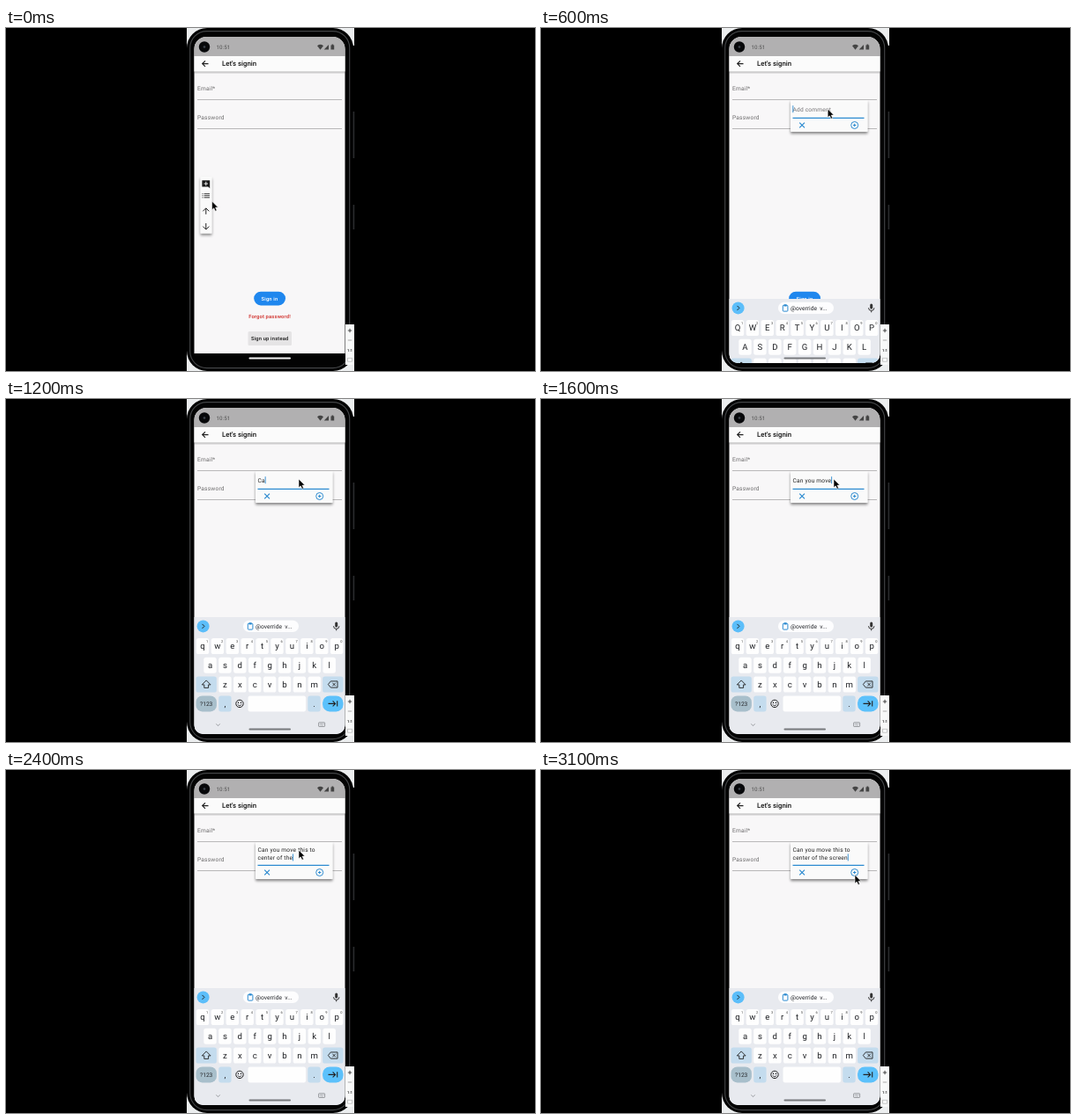
An HTML page for the animation above (3200 ms loop, 600 by 390 pixels).

```html
<!DOCTYPE html>
<html lang="en">
<head>
<meta charset="utf-8">
<title>Sign-in comment</title>
<style>
  html, body { margin: 0; width: 100%; height: 100%; overflow: hidden; background: #000; }
  svg { display: block; width: 600px; height: 390px; }
  text { font-family: Roboto, sans-serif; white-space: pre; text-rendering: geometricPrecision; }
  .field { font-size: 6.6px; letter-spacing: .2px; }
  .label { font-size: 5.8px; font-weight: 500; letter-spacing: .16px; text-anchor: middle; }
  .key { font-size: 9.6px; text-anchor: middle; fill: #202226; }
  .line { fill: none; stroke: #222; }
  .blue { fill: none; stroke: #2b8ad0; }
</style>
</head>
<body>
<svg viewBox="0 0 600 390">
  <defs>
    <clipPath id="screen"><path d="M213.500 24a14 14 0 0 1 14-14H370.500a14 14 0 0 1 14 14V371a10 10 0 0 1-10 10H223.500a10 10 0 0 1-10-10Z"/></clipPath>
    <filter id="shadow" x="-40%" y="-30%" width="180%" height="180%">
      <feDropShadow dx="0" dy="2.2" stdDeviation="1.8" flood-color="#000" flood-opacity=".45"/>
    </filter>
    <linearGradient id="fade" x2="0" y2="1"><stop stop-color="#000" stop-opacity=".3"/><stop offset="1" stop-color="#000" stop-opacity="0"/></linearGradient>
  </defs>

  <!-- phone body -->
  <rect width="600" height="390"/>
  <rect x="205" width="190" height="390" fill="#eceeef"/>
  <rect x="205" y="0" width="189" height="390" rx="23"/>
  <rect x="208.700" y="3.600" width="181" height="383" rx="19" fill="#030303" stroke="#444648" stroke-width="1.100"/>
  <path d="M394 20V370" stroke="#000" stroke-width="2"/>
  <path d="M394.400 95V148M394.400 201V229" stroke="#2b2c2e" stroke-width="1.600"/>

  <g clip-path="url(#screen)">
    <!-- app -->
    <rect x="213" y="10" width="172" height="360.200" fill="#f8f7f8"/>
    <rect x="213" y="49" width="172" height="3.500" fill="url(#fade)"/>
    <rect x="213" y="32" width="172" height="17.500" fill="#fbfbfb"/>
    <rect x="213" y="10" width="172" height="22" fill="#b1b0b1"/>
    <circle cx="225" cy="21.500" r="6.200" fill="#07080a"/>
    <circle cx="225" cy="21.500" r="1.300" fill="#3c434c"/>
    <text x="238.500" y="24" font-size="6.200" letter-spacing=".1" fill="#505050">10:51</text>
    <g fill="#444">
      <path d="M353 20.200q3.500-2.800 7 0L356.500 24.700Z"/>
      <path d="M360.700 24.500H366V19Z"/>
      <path d="M368.500 19.400h1v-.8h1.700v.8h1v5.200h-3.700Z"/>
    </g>
    <path class="line" d="M229.500 40.600H222.800M226 37.300L222.700 40.600L226 43.900" stroke-width="1.200"/>
    <text x="245" y="43.200" font-size="7.800" font-weight="500" fill="#111">Let's signin</text>
    <g class="field" fill="#6c6b6c">
      <text x="217" y="71.300">Email*</text>
      <text x="217" y="103.800">Password</text>
    </g>
    <path d="M217 81.500H381M217 114.500H381" stroke="#b3b2b3" stroke-width=".9"/>
    <rect x="281.200" y="299.800" width="35.800" height="15.600" rx="7.800" fill="#1f87ee"/>
    <text class="label" x="299" y="309.800" fill="#fff">Sign in</text>
    <text class="label" x="299" y="330.400" fill="#cf2a25">Forgot password!</text>
    <rect x="274.500" y="345" width="49.500" height="16" rx="1.500" fill="#e5e4e5"/>
    <text class="label" x="299.200" y="355.100" fill="#1c1c1c">Sign up instead</text>

    <!-- floating tools -->
    <g id="tools">
      <rect x="220.500" y="169" width="13" height="64.500" rx="1" fill="#fafafa" filter="url(#shadow)"/>
      <path d="M222.400 173.300h8.800v9l-1.800-1.700h-7Z" fill="#181818"/>
      <path d="M226.800 174.700v4.600M224.500 177h4.600" stroke="#fff" stroke-width=".9"/>
      <path class="line" d="M224.600 188.600h6.400M224.600 190.700h6.400M224.600 192.800h6.400M222.500 188.600h1M222.500 190.700h1M222.500 192.800h1" stroke-width=".9"/>
      <path class="line" d="M226.800 211.800V205M223.300 208.300L226.800 204.800L230.300 208.300"/>
      <path class="line" d="M226.800 222V229M223.300 225.600L226.800 229.100L230.300 225.600"/>
    </g>

    <!-- comment box -->
    <g id="dialog">
      <rect id="card" x="283" y="82" width="87.500" height="36" rx="1" fill="#fafafa" filter="url(#shadow)"/>
      <text id="first" class="field" x="285.500"></text>
      <text id="second" class="field" x="285.500" y="101.800" fill="#222"></text>
      <rect id="caret" width=".9" height="8" fill="#2b8ad0"/>
      <g id="actions">
        <path class="blue" d="M285.500 102.400H366.500" stroke-width="1.200"/>
        <path class="blue" d="M293.200 107.600l5.800 5.800M299 107.600l-5.800 5.800" stroke-width="1.200"/>
        <circle class="blue" cx="355.700" cy="110.500" r="4"/>
        <path class="blue" d="M355.700 108.800v3.400M354 110.500h3.400"/>
      </g>
    </g>

    <!-- keyboard and navigation -->
    <rect id="nav" x="213" y="370.200" width="172" height="11"/>
    <g id="keyboard"></g>
    <rect id="home" x="275.500" y="374.600" width="47.500" height="1.900" rx=".95"/>
  </g>

  <!-- emulator side controls -->
  <rect x="385" y="337" width="10" height="46" fill="#f8f9f9"/>
  <path class="line" d="M387.800 344h4.400M390 341.800v4.400" stroke-width=".8"/>
  <path d="M387.800 355h4.400" stroke="#888" stroke-width=".7"/>
  <text x="390" y="367.500" font-size="4.200" font-weight="700" text-anchor="middle" fill="#333">1:1</text>
  <rect x="387.700" y="375.200" width="4.600" height="4" fill="none" stroke="#aaa" stroke-width=".6"/>

  <path id="pointer" d="M0 0V9.800L2.200 7.800L3.800 11.200L5.500 10.400L4 7.100H7Z" fill="#000" stroke="#fff" stroke-width=".6"/>
</svg>

<script>
const LOOP = 3200, STEP = 100;
const MESSAGE = "Can you move this to center of the screen";
const WRAP = 21, LINE_MAX = 24;

// [time, x, y] of the pointer tip
const POINTER = [
  [0, 233.6, 197], [100, 227.5, 178], [300, 283, 83], [400, 300, 89], [500, 316.6, 92],
  [700, 333.8, 92], [1200, 332, 91], [2700, 332, 91], [3100, 356, 119.3]
];
// [time, typed characters]
const TYPING = [[900, 0], [1200, 2], [2100, 24], [2400, 34], [2700, 41]];
// [time, keyboard offset]
const SLIDE = [[500, 133], [600, 60], [700, 0]];

const $ = id => document.getElementById(id);
const show = (node, on) => node.setAttribute("display", on ? "inline" : "none");

function track(keys, t, col = 1) {
  if (t <= keys[0][0]) return keys[0][col];
  for (let i = 1; i < keys.length; i++) {
    const a = keys[i - 1], b = keys[i];
    if (t <= b[0]) return a[col] + (b[col] - a[col]) * (t - a[0]) / (b[0] - a[0]);
  }
  return keys[keys.length - 1][col];
}

const TINT = "#c4dcee";
const cap = (x, y, w, fill = "#fefefe", r = 2.6) =>
  `<rect x="${x - w / 2}" y="${y - 9}" width="${w}" height="18" rx="${r}" fill="${fill}"/>`;
const icon = (d, width = 1) => `<path class="line" d="${d}" stroke-width="${width}"/>`;

function buildKeyboard() {
  const pitch = 16.9;
  let out = `<rect x="213" y="248" width="172" height="134" fill="#e8eaef"/>`;

  // suggestion strip
  out += `<circle cx="223.600" cy="258.400" r="7" fill="#5cbefa"/>` + icon("M222.500 255.900l2.500 2.500l-2.500 2.500");
  out += `<rect x="269" y="251.800" width="63" height="13.200" rx="6.600" fill="#fdfdfe"/>`;
  out += `<rect class="blue" x="274.300" y="255.300" width="5.600" height="6.800" rx=".8"/>
    <path d="M275.600 254.200h3v2.300h-3Z" fill="#2b8ad0"/>`;
  out += `<text x="283" y="260.900" font-size="6.700" fill="#25272b">@override  v...</text>`;
  out += `<rect x="373.200" y="253.500" width="3" height="6" rx="1.500" fill="#333"/>` +
    icon("M371.500 258.200a3.200 3.200 0 0 0 6.400 0M374.700 261.400v2", .9);

  // letter rows
  [["qwertyuiop", 223, 281], ["asdfghjkl", 231.5, 302.7], ["zxcvbnm", 248.4, 324.5]].forEach(([letters, x0, y], row) => {
    [...letters].forEach((ch, i) => {
      const x = x0 + i * pitch;
      out += cap(x, y, 14.4) + `<text class="key letter" x="${x}" y="${y + 3.4}">${ch}</text>`;
      if (!row) out += `<text x="${x + 5.2}" y="${y - 4.4}" font-size="4" text-anchor="middle" fill="#444">${(i + 1) % 10}</text>`;
    });
  });

  // function keys
  out += cap(227.2, 324.5, 23.4, TINT) + cap(370.8, 324.5, 23.4, TINT);
  out += `<path id="shift" d="M227.200 319.900L222.300 324.900H224.800V328.400H229.600V324.900H232.100Z" stroke="#222" stroke-width=".9" stroke-linejoin="round"/>`;
  out += icon("M365.400 324.500L368.300 320.900H376V328.100H368.300ZM370.300 322.700l3.600 3.600M373.900 322.700l-3.600 3.600", .9);

  // bottom row
  const y = 346.4;
  out += cap(227.2, y, 23.4, "#a8bfcb", 7) +
    `<text x="227.200" y="348.900" font-size="6.600" text-anchor="middle" fill="#25272b">?123</text>`;
  out += cap(248.4, y, 14.4, TINT) + cap(349.5, y, 14.4, TINT) + cap(307.3, y, 65.6);
  out += `<text class="key" x="248.400" y="350">,</text><text class="key" x="349.500" y="350">.</text>`;
  out += `<circle class="line" cx="265" cy="346.400" r="4.200"/><circle cx="263.500" cy="345.200" r=".7"/>
    <circle cx="266.500" cy="345.200" r=".7"/>` + icon("M262.700 347.500q2.300 2.800 4.600 0", .8);
  out += cap(370.8, y, 23.4, "#5cc1fb", 8) + icon("M365.500 346.400H373.400M370.600 343.400l3 3l-3 3M375.700 343.200v6.400", 1.1);

  // collapse and layout icons
  out += `<g fill="none" stroke="#85878b" stroke-width=".8"><path d="M238.300 369.400l2.200 2.200l2.200-2.200"/>
    <rect x="354.600" y="367.800" width="7" height="4.600" rx=".5"/>
    <path d="M355.800 369.400h4.600M356.600 371.100h3" stroke-dasharray=".8 .5"/></g>`;
  $("keyboard").innerHTML = out;
}

buildKeyboard();
const letters = [...document.querySelectorAll(".letter")];
const lower = letters.map(node => node.textContent);
const [first, second, caret] = ["first", "second", "caret"].map($);

function draw(t) {
  const typed = Math.round(track(TYPING, t));
  const wrapped = typed > LINE_MAX;
  const keys = t >= 600;

  $("pointer").setAttribute("transform", `translate(${track(POINTER, t, 1)} ${track(POINTER, t, 2)})`);
  show($("tools"), t < 200);
  show($("dialog"), t >= 400);

  first.textContent = typed ? MESSAGE.slice(0, wrapped ? WRAP - 1 : typed) : "Add comment";
  first.setAttribute("fill", typed ? "#222" : "#737174");
  first.setAttribute("y", wrapped ? 93.4 : 94.6);
  second.textContent = wrapped ? MESSAGE.slice(WRAP, typed) : "";
  $("card").setAttribute("height", wrapped ? 42 : 36);
  $("actions").setAttribute("transform", `translate(0 ${wrapped ? 6 : 0})`);

  const line = wrapped ? second : first;
  caret.setAttribute("x", 285.4 + (typed ? line.getComputedTextLength() : 0));
  caret.setAttribute("y", wrapped ? 95.4 : 88.2);
  show(caret, typed > 0 || t === 500 || t === 600);

  show($("keyboard"), keys);
  $("keyboard").setAttribute("transform", `translate(0 ${track(SLIDE, t)})`);
  $("nav").setAttribute("fill", keys ? "#e8eaef" : "#030303");
  $("home").setAttribute("fill", keys ? "#77797c" : "#f4f4f4");
  $("shift").setAttribute("fill", typed ? "none" : "#111");
  letters.forEach((node, i) => node.textContent = typed ? lower[i] : lower[i].toUpperCase());
}

let last = -1;
function tick() {
  const t = Math.floor(performance.now() % LOOP / STEP) * STEP;
  if (t !== last) draw(last = t);
  requestAnimationFrame(tick);
}
draw(0);
tick();
</script>
</body>
</html>
```
